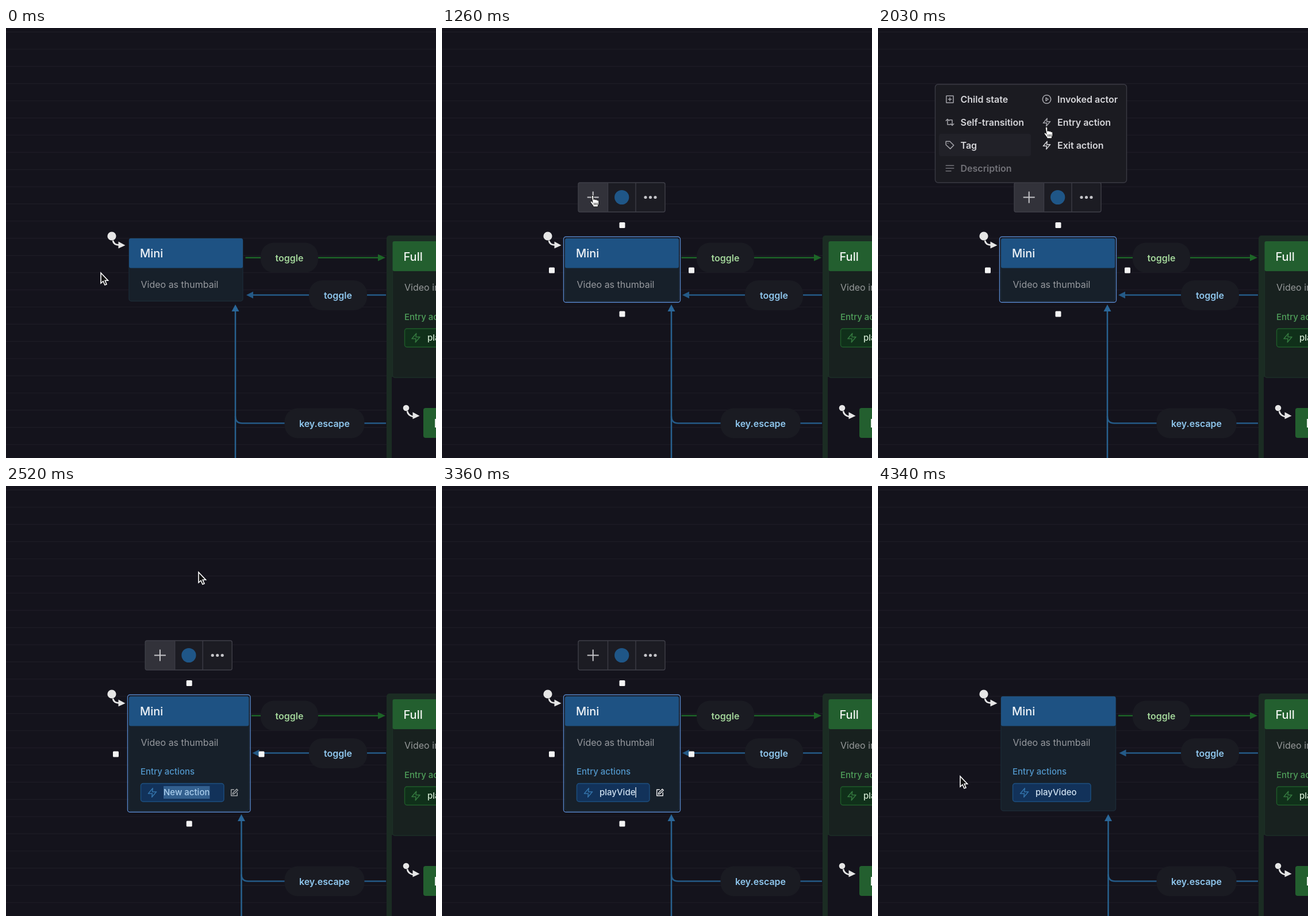
An HTML page for the animation above (4410 ms loop, 748 by 748 pixels).

```html
<!DOCTYPE html>
<html lang="en">
<head>
<meta charset="utf-8">
<title>State machine editor</title>
<style>
  html, body { margin: 0; width: 100%; height: 100%; overflow: hidden; background: #14131c; }
  svg { display: block; width: 748px; height: 748px; font: 500 15px Inter, sans-serif; white-space: pre; }
  .icon { fill: none; stroke-linecap: round; stroke-linejoin: round; }
</style>
</head>
<body>
<svg id="stage" viewBox="0 0 748 748"></svg>
<script>
const LOOP = 4410, STEP = 70;
const SELECT = 840, HOVER = 1120, MENU = 1400, ADD = 2380, TYPE = 2870, SHOW = 3990, DONE = 4270;
const BLUE = '#245a87', GREEN = '#1d6527';
const stage = document.getElementById('stage');
const pen = document.createElement('canvas').getContext('2d');

// Cursor tip: time, x, y
const route = [
  [0, 165, 426], [70, 165, 426], [560, 246, 391], [900, 246, 391], [1190, 262, 291],
  [1540, 262, 291], [1820, 264, 215], [2030, 293, 172], [2200, 335, 150],
  [3950, 335, 150], [4250, 143, 505], [LOOP, 143, 505]
];

const icons = {
  bolt: 'M13 2 3 14h9l-1 8 10-12h-9z',
  edit: 'M11 4H4v16h16v-8M18.5 2.5l3 3L12 15l-4 1 1-4z',
  child: 'M4 3h16q1 0 1 1v16q0 1-1 1H4q-1 0-1-1V4q0-1 1-1zM12 8v8M8 12h8',
  play: 'M12 1.5a10.5 10.5 0 1 0 .01 0M10 8l6 4-6 4z',
  loop: 'M2 8l4-4 4 4M6 4v14h7M22 16l-4 4-4-4M18 20V6h-7',
  tag: 'M2 2h10l10 10-9 9L2 11zM7 7h.01',
  lines: 'M2 5h20M2 12h20M2 19h13'
};

const rect = (x, y, w, h, fill, r = 0, more = '') =>
  `<rect x="${x}" y="${y}" width="${w}" height="${h}" rx="${r}" fill="${fill}" ${more}/>`;
const path = (d, stroke, w = 2.5, fill = 'none') =>
  `<path d="${d}" stroke="${stroke}" stroke-width="${w}" fill="${fill}"/>`;
const shape = (d, fill) => `<path d="${d}" fill="${fill}"/>`;
const dot = (x, y, r, fill) => `<circle cx="${x}" cy="${y}" r="${r}" fill="${fill}"/>`;
const text = (x, y, s, fill, size = 15, weight = 500, anchor = 'start') =>
  `<text x="${x}" y="${y}" fill="${fill}" font-size="${size}" font-weight="${weight}" text-anchor="${anchor}">${s}</text>`;
const icon = (name, x, y, color, k = 0.68) =>
  `<path class="icon" d="${icons[name]}" stroke="${color}" stroke-width="${1.5 / k}" ` +
  `transform="translate(${x} ${y}) scale(${k}) translate(-12 -12)"/>`;
const pill = (x, y, w, label, color) =>
  rect(x - w / 2, y - 26, w, 52, '#1a1b22', 23) + text(x, y + 6, label, color, 16, 600, 'middle');
const outline = color => `stroke="${color}" stroke-width="1.4"`;

function textWidth(s) {
  pen.font = '500 15px Inter, sans-serif';
  return pen.measureText(s).width;
}

function cursorAt(t) {
  const i = route.findIndex(p => p[0] > t);
  const [t0, x0, y0] = route[i - 1], [t1, x1, y1] = route[i];
  const u = (t - t0) / (t1 - t0), e = u * u * (3 - 2 * u);
  return [x0 + (x1 - x0) * e, y0 + (y1 - y0) * e];
}

function cursor(t) {
  if (t >= TYPE && t < SHOW) return '';
  const [x, y] = cursorAt(t);
  const over = (l, top, r, b) => x > l && x < r && y > top && y < b;
  const hand = t < ADD && (over(214, 366, 412, 475) ||
    t >= SELECT && over(237, 269, 388, 320) || t >= MENU && over(99, 98, 432, 269));
  const art = hand
    ? path('M-1.8 2a1.8 1.8 0 0 1 3.6 0v5.5c.5-1 3-.8 3.2.6.6-.9 2.8-.6 3 .8 1-.7 2.8 0 2.8 1.6v3.2' +
        'c0 2-1.6 3.4-1.6 6.3h-8c0-2.5-2.8-4.5-4.5-7.4-1.2-2 1-3 2-1.8l1.3 1.6z', '#111', 1, '#fff') +
      path('M2.8 13v4M5.4 13v4M8 13v4', '#111', 1)
    : path('M0 0V18L4 14.5 7 21 10 19.8 7.2 13.2H12.5Z', '#fff', 1.6, '#111');
  return `<g transform="translate(${x} ${y})">${art}</g>`;
}

function grid() {
  let d = '';
  for (let i = 0; i < 25; i++) d += `M0 ${7 + i * 29.9}H748`;
  return path(d, '#1c1b24', 1.4);
}

function initial(x, y, r) {
  const c = '#e6e6e6';
  return dot(x, y, r, c) + path(`M${x + 2} ${y + r}q1 8 12 ${15.5 - r}`, c, 2.8) +
    shape(`M${x + 11.5} ${y + 8 + r - 6}l12 6.5-12 5.5z`, c);
}

function fullCard() {
  return rect(662, 361, 110, 420, '#1b2c23', 5) +
    rect(671, 607, 90, 160, '#14131c') +
    rect(672.5, 371, 100, 237, '#18211f', 4, outline('#1d2f27')) +
    rect(672.5, 371, 100, 52, '#235f2f', 3) +
    text(691.5, 405, 'Full', '#f2f5f2', 20) +
    text(693, 457, 'Video in player', '#96999a', 16, 400) +
    text(693, 508, 'Entry actions', '#4f9f5a') +
    rect(693.5, 523, 130, 32, '#10301a', 4, outline('#1f5b2a')) +
    icon('bolt', 713, 539, '#34793f', 0.78) +
    text(733, 544, 'playVideo', '#cfe6cf') +
    initial(696, 661, 5.3) +
    rect(726, 661, 50, 52, '#235f2f', 4) +
    text(744.5, 695, 'Playing', '#f2f5f2', 20);
}

function arrows(right, bottom) {
  const x = right - 13, tip = bottom + 6;
  return path(`M${right + 4.5} 399.5H650`, GREEN) + shape('M660 399.5l-13-6v12z', GREEN) +
    path(`M661 464.5H${right + 16}`, BLUE) + shape(`M${right + 6} 464.5l12-6v12z`, BLUE) +
    path(`M661 687.5H${x + 12}Q${x} 687.5 ${x} 675.5`, BLUE) +
    path(`M${x} 748V${tip + 10}`, '#28628f') + shape(`M${x} ${tip}l-6.5 12h13z`, '#2a6799') +
    pill(493, 399.5, 100, 'toggle', '#a3d69a') +
    pill(577.5, 465, 101, 'toggle', '#8fc7ee') +
    pill(554, 687.5, 139, 'key.escape', '#8fc7ee');
}

function actionInput(t, label, end) {
  const picked = t < TYPE, editing = t < DONE;
  return text(234, 502, 'Entry actions', '#5297cb') +
    rect(234.5, 517.5, end - 234.5, 31.5, '#12325a', 4, outline('#1d4f80')) +
    icon('bolt', 254.5, 533.5, '#3373aa', 0.78) +
    (picked ? rect(274, 522, textWidth(label), 22, '#33608f') : '') +
    text(274, 538, label, picked ? '#a9cdec' : '#cfe1f1') +
    (editing ? icon('edit', end + 18, 533.5, picked ? '#a2a5a8' : '#e8e8ea', 0.66) : '') +
    (editing && !picked ? rect(274 + textWidth(label), 524, 1.3, 18, '#f0f4f8') : '');
}

function toolbar(mid, lit) {
  const c = '#c4c4c8';
  return `<g transform="translate(${mid - 313} 0)">` +
    rect(237, 269, 151, 51, '#1c1c23', 3) +
    (lit ? rect(237, 269, 51.5, 51, '#32323a', 3) : '') +
    path('M288.5 269v51M337 269v51', '#3c3c45', 1.4) +
    rect(237, 269, 151, 51, 'none', 3, outline('#3f3f48')) +
    path('M262.7 284.5v20M252.7 294.5h20', c, 2) +
    dot(312.7, 294.5, 12.6, '#1f5687') +
    [354, 362.5, 371].map(x => dot(x, 294.5, 2.6, c)).join('') + '</g>';
}

function menu(t) {
  const c = '#d6d6da', dim = '#a4a4aa', off = '#727278';
  const item = (name, x, y, label, color, mark = dim) =>
    icon(name, x, y, mark) + text(x + 18.5, y + 6, label, color, 16, 600);
  return rect(99.5, 98, 333, 171, '#1b1b21', 5, outline('#3a3a43')) +
    (t >= 1750 && t <= 2060 ? rect(106, 184, 160, 39, '#212128', 4) : '') +
    item('child', 125, 124, 'Child state', c) + item('play', 293.5, 124, 'Invoked actor', c) +
    item('loop', 125, 164, 'Self-transition', c) + item('bolt', 293.5, 164, 'Entry action', c) +
    item('tag', 125, 204, 'Tag', c) + item('bolt', 293.5, 204, 'Exit action', c, c) +
    item('lines', 125, 244, 'Description', off, off);
}

function selection(right, bottom) {
  const mid = (214 + right) / 2, side = (368 + bottom) / 2;
  const spots = [[mid + 0.5, 343], [mid + 0.5, bottom + 22.5], [191, side], [right + 22, side]];
  return rect(211.5, 363.3, right - 209, bottom - 361, 'none', 4, outline('#5686c8')) +
    spots.map(([x, y]) => rect(x - 5, y - 5, 10, 10, '#f4f4f4', 1.5)).join('');
}

function draw(t) {
  const added = t >= ADD, selected = t >= SELECT && t < DONE;
  const label = t < TYPE ? 'New action' : 'playVideo'.slice(0, Math.floor((t - TYPE) / STEP) + 1);
  const end = 274 + textWidth(label) + 24.5;
  const right = added ? Math.max(412, end + 43.5) : 412;
  const bottom = added ? 565 : 475;
  stage.innerHTML = grid() + fullCard() + arrows(right, bottom) + initial(184, 362, 7.6) +
    rect(214, 366, right - 214, bottom - 366, '#17202a', 4, outline('#1c2a36')) +
    rect(214, 366, right - 214, 51.5, '#1e5283', 3) +
    text(233, 399, 'Mini', '#f0f4f8', 20) +
    text(234.5, 451.5, 'Video as thumbail', '#96999e', 16, 400) +
    (added ? actionInput(t, label, end) : '') +
    (selected ? selection(right, bottom) + toolbar((214 + right) / 2, t >= HOVER && t < TYPE) : '') +
    (t >= MENU && !added ? menu(t) : '') +
    cursor(t);
}

const start = performance.now();
let last = -1;
function tick() {
  const t = Math.floor((performance.now() - start) % LOOP / STEP) * STEP;
  if (t !== last) draw(last = t);
  requestAnimationFrame(tick);
}
tick();
</script>
</body>
</html>
```
